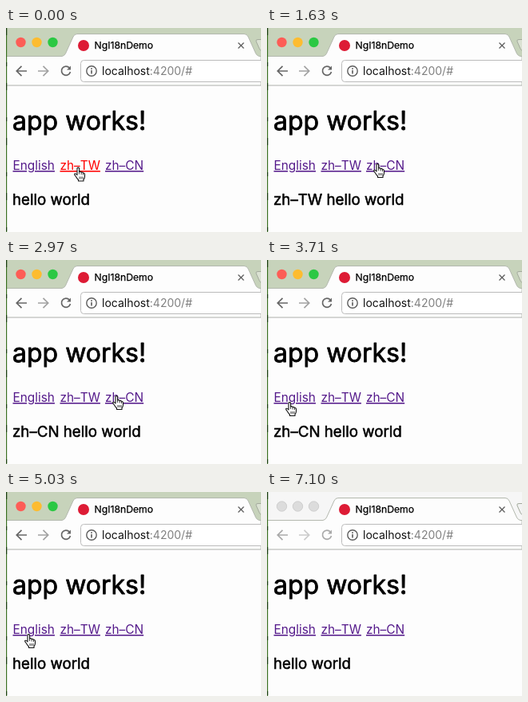
Recreate the animation shown at these times as an HTML page. Size 319 by 256 pixels, loop 7.2 s.

```html
<!DOCTYPE html>
<html lang="en">
<head>
<meta charset="utf-8">
<title>Language switch demo</title>
<style>
  html, body { margin: 0; width: 100%; height: 100%; overflow: hidden; background: #fdfdfd; }
  svg { display: block; width: 319px; height: 256px; }
  text { white-space: pre; font-family: Inter, Roboto, sans-serif; }
  .page { font-size: 15.4px; }
  .bold { stroke: #000; stroke-linejoin: round; }
  .link { fill: #551a8b; text-decoration: underline; text-decoration-thickness: 1px; text-decoration-skip-ink: none; }
  .line { fill: none; stroke: #666; stroke-width: 1.7; }
</style>
</head>
<body>
<svg viewBox="0 0 319 256">
  <rect width="319" height="256" fill="#fdfdfd"/>

  <rect id="strip" width="319" height="36"/>
  <path id="nextTab" d="M320 14.5H315Q312 14.5 313 17L317 26Q318 28.5 320 28.5" stroke="#a3aa9c"/>
  <path d="M0 35.5H70Q73 35 74.500 32L84 11Q85.500 7.500 89 7.500H298Q301.500 7.500 303 11L312.500 32Q314 35 317 35.500H319V72H0Z" fill="#fdfdfd" stroke="#b3b8ae"/>
  <path d="M0 72.500H319" stroke="#d2d2d2"/>
  <g id="lights">
    <circle cx="18.500" cy="18" r="6.200"/>
    <circle cx="38.500" cy="18" r="6.200"/>
    <circle cx="58.500" cy="18" r="6.200"/>
  </g>

  <circle id="icon" cx="97" cy="22" r="7" fill="#dd1b35"/>
  <path id="spinner" d="M97 15.500A6.500 6.500 0 0 1 102.600 25.200" fill="none" stroke="#4a86e0" stroke-width="2.200"/>
  <text class="bold" x="110.500" y="26" font-size="12.200" stroke-width=".25">NgI18nDemo</text>
  <path d="M290.500 18.500l7 7m0-7l-7 7" stroke="#5c5c5c" stroke-width="1.300"/>

  <g id="buttons">
    <path class="line" d="M26 54H13.500M19.500 47.800L13.300 54L19.500 60.200"/>
    <path class="line" d="M40 54H52.500M46.500 47.800L52.700 54L46.500 60.200" opacity=".6"/>
    <g id="reload">
      <path class="line" d="M79.300 50A5.600 5.600 0 1 0 80.500 55"/>
      <path d="M81 47.500V52.500H76Z" fill="#666"/>
    </g>
    <path id="stop" class="line" d="M70 49l10 10m0-10l-10 10"/>
  </g>
  <rect x="93.500" y="40.500" width="240" height="27" rx="4" fill="#fff" stroke="#bcbcbc"/>
  <circle cx="107" cy="54" r="6.200" fill="none" stroke="#5c5c5c" stroke-width="1.400"/>
  <path d="M107 53V57.500M107 50.300V51.900" stroke="#5c5c5c" stroke-width="1.600"/>
  <text x="120" y="59" font-size="14" fill="#111">localhost<tspan fill="#808080">:4200/#</tspan></text>

  <g id="content" class="page">
    <text class="bold" x="8" y="128" font-size="32" stroke-width=".8">app works!</text>
    <text class="link" x="8.500" y="178">English</text>
    <text class="link" x="67.500" y="178">zh–TW</text>
    <text class="link" x="124" y="178">zh–CN</text>
    <text id="greeting" class="bold" x="8" y="222" font-size="18.720" stroke-width=".55"></text>
  </g>
  <text id="loading" class="page" x="8.500" y="98">Loading...</text>

  <g id="hand" stroke="#111" stroke-width="1.100" stroke-linejoin="round">
    <path d="M4 10V2Q4 .6 5.300 .6T6.600 2V6Q8.800 5 9.200 6.800Q11 6 11.500 7.600Q13.500 7 13.500 9.500V12Q13.500 14 12 15.500V17.500H5.500V16Q3.500 14 2.500 12Q.2 9.500 .8 8.500Q2 7.500 4 10Z" fill="#fff"/>
    <path d="M6.600 6V9M9.200 7V9.500M11.500 8V10M7 12V15M9 12V15M11 12V15" fill="none" stroke-width=".8"/>
  </g>
  <path id="arrow" d="M.5 .5V14L3.700 11L6 16.500L8.300 15.500L6 10.300H10.300Z" fill="#111" stroke="#fff"/>

  <rect width="1.200" height="256" fill="#3f7426"/>
  <path d="M.6 0V256" stroke="#23441a" stroke-width="1.200" stroke-dasharray="9 34 5 21"/>
</svg>
<script>
const LOOP = 7200;
const $ = id => document.getElementById(id);
const links = [...document.querySelectorAll('.link')];
const lights = [...$('lights').children];
const lightColors = ['#fd5d56', '#fdbc30', '#2bc843'];

// start, view, greeting prefix, pressed link
const scenes = [
  [0, 'page', '', 1],
  [300, 'busy', ''],
  [450, 'loading', ''],
  [890, 'page', 'zh–TW '],
  [1930, 'page', 'zh–TW ', 2],
  [2080, 'busy', 'zh–TW '],
  [2220, 'loading', ''],
  [2970, 'page', 'zh–CN '],
  [4010, 'page', 'zh–CN ', 0],
  [4300, 'busy', 'zh–CN '],
  [4590, 'loading', ''],
  [5030, 'page', '']
];

// start, pointer, x, y
const pointer = [
  [0, 'hand', 85, 174.5],
  [1340, 'hand', 99, 173],
  [1485, 'hand', 124, 171],
  [1630, 'hand', 133, 170],
  [3420, 'hand', 109, 172],
  [3570, 'hand', 47, 176],
  [3710, 'hand', 23, 178],
  [5620, 'hand', 27, 177.5],
  [5770, 'hand', 39, 176],
  [5920, 'hand', 52, 173.5],
  [6070, 'hand', 80, 172],
  [6220, 'arrow', 132, 186],
  [6360, 'arrow', 196, 213],
  [6510, 'arrow', 252, 241],
  [6660, 'none', 0, 0]
];

const at = (track, t) => track.findLast(key => key[0] <= t);
const show = (id, on) => $(id).setAttribute('display', on ? 'inline' : 'none');

function draw(t) {
  const [, view, prefix, pressed] = at(scenes, t);
  const [, shape, x, y] = at(pointer, t);
  const busy = view !== 'page';
  const focused = t < 7100;

  show('content', view !== 'loading');
  show('loading', view === 'loading');
  show('icon', !busy);
  show('spinner', busy);
  show('reload', !busy);
  show('stop', busy);
  $('greeting').textContent = prefix + 'hello world';
  links.forEach((link, i) => link.style.fill = i === pressed ? '#f00' : '');

  const tick = Math.floor((t + 10) / 147);
  $('spinner').setAttribute('transform', `rotate(${(tick - 15) * 50} 97 22)`);

  for (const id of ['hand', 'arrow']) {
    show(id, shape === id);
    $(id).setAttribute('transform', `translate(${x} ${y})`);
  }

  $('strip').setAttribute('fill', focused ? '#c7d3bb' : '#f6f6f6');
  $('nextTab').setAttribute('fill', focused ? '#dbe2d3' : '#f2f2f2');
  $('buttons').setAttribute('opacity', focused ? 1 : .55);
  lights.forEach((light, i) => {
    light.setAttribute('fill', focused ? lightColors[i] : '#dcdcdc');
    light.setAttribute('stroke', focused ? 'none' : '#cfcfcf');
  });
}

const start = performance.now();
function frame() {
  draw((performance.now() - start) % LOOP);
  requestAnimationFrame(frame);
}
frame();
</script>
</body>
</html>
```
